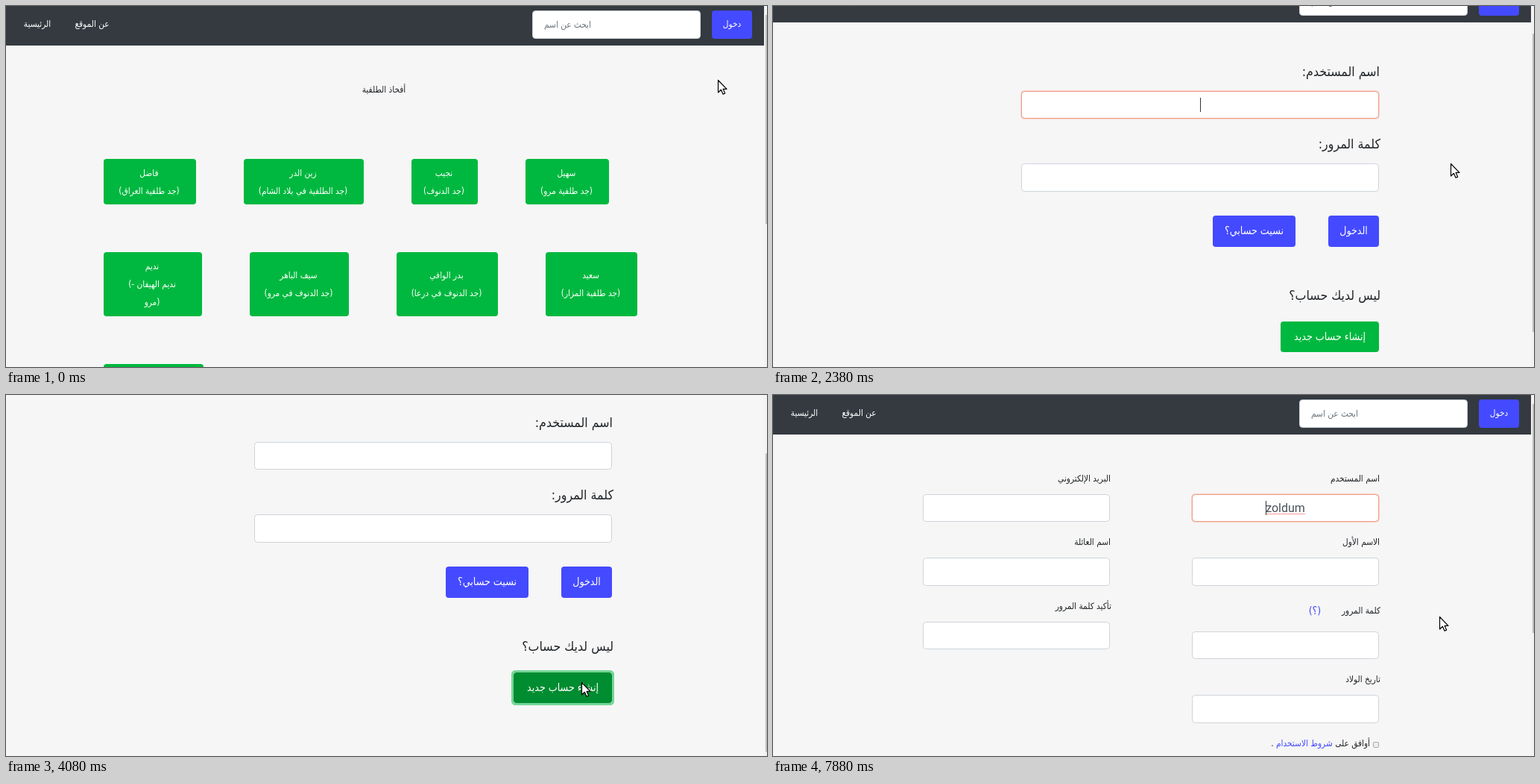
Recreate the animation shown at these times as an HTML page. Size 1021 px wide and 484 px high, loop 8000 ms.

```html
<!DOCTYPE html>
<html lang="ar">
<head>
<meta charset="utf-8">
<style>
html, body { margin: 0; width: 100%; height: 100%; overflow: hidden; background: #f6f6f6; }
svg { display: block; }
text { font-family: "DejaVu Sans", sans-serif; font-stretch: condensed; white-space: pre; }
.typed { font: 16px Roboto, sans-serif; }
</style>
</head>
<body>
<svg id="stage" width="1021" height="484" viewBox="0 0 1021 484"></svg>
<script>
const LOOP = 8000, USERNAME = 'zoldum';
const BLUE = '#444aff', GREEN = '#00b83f', INK = '#212529';
const stage = document.getElementById('stage');
const $ = id => document.getElementById(id);

// Calibrate the Arabic face once so that 16 units match the page's body text.
function bodyScale() {
  stage.innerHTML = '<text id="probe" font-size="160" direction="rtl">اسم المستخدم</text>';
  return 66 * 10 / $('probe').getComputedTextLength();
}
const scale = bodyScale();

const text = (x, y, str, { size = 16, fill = INK, anchor = 'middle', dir = 'rtl' } = {}) =>
  `<text x="${x}" y="${y}" font-size="${(size * scale).toFixed(2)}" fill="${fill}" text-anchor="${anchor}" direction="${dir}">${str}</text>`;
const label = (x, y, str, size) => text(x, y, str, { size, anchor: 'start' });
const box = (x, y, w, h, fill, extra = '') =>
  `<rect x="${x}" y="${y}" width="${w}" height="${h}" rx="4" fill="${fill}" ${extra}/>`;
const input = (x, y, w, h = 37) => box(x + .5, y + .5, w - 1, h - 1, '#fff', 'stroke="#ced4da"');
const focusRing = (id, x, y, w, h) => `<g id="${id}">
  ${box(x - .5, y - .5, w + 1, h + 1, 'none', 'stroke="#f9d3c8"')}
  ${box(x + .5, y + .5, w - 1, h - 1, 'none', 'stroke="#f19e88"')}</g>`;
const caret = (id, x, y) => `<rect id="${id}" x="${x}" y="${y}" width="1" height="19" fill="#333"/>`;
const button = (x, y, w, h, str, fill = BLUE, size = 19.2, id = '') =>
  box(x, y, w, h, fill) +
  (id && box(x, y, w, h, '#000', `id="${id}"`)) +
  text(x + w / 2, y + h / 2 + size * .27 - 1, str, { size, fill: '#fff' });

function card(x, y, w, h, lines, dir = 'rtl') {
  const first = y + h / 2 - (lines.length - 1) * 12 + 4;
  return box(x, y, w, h, GREEN) +
    lines.map((s, i) => text(x + w / 2 - 1, first + i * 24, s, { fill: '#fff', dir })).join('');
}

const nav = `<g id="nav">
  <rect width="1017" height="53" fill="#343a40"/>
  ${text(42, 28, 'الرئيسية', { fill: '#fff' })}
  ${text(115.5, 28, 'عن الموقع', { fill: '#fff' })}
  ${input(706, 6, 226, 38)}
  ${text(753.5, 29, 'ابحث عن اسم', { fill: '#6c757d' })}
  ${box(945.5, 4.5, 57, 41, 'none', 'id="navRing" stroke="#4a70b4" stroke-width="3"')}
  ${button(947, 6, 54, 38, 'دخول', BLUE, 16, 'navShade')}
</g>`;

const home = `<g id="home">
  ${text(507, 116, 'أفخاذ الطلفية')}
  ${card(131, 205, 124, 61, ['فاضل', '(جد طلفية العراق)'])}
  ${card(319, 205, 161, 61, ['زين الدر', '(جد الطلفية في بلاد الشام)'])}
  ${card(544, 205, 89, 61, ['نجيب', '(جد الدنوف)'])}
  ${card(697, 205, 112, 61, ['سهيل', '(جد طلفية مرو)'])}
  ${card(131, 330, 132, 86, ['نديم', '(- نديم الهيفان', 'مرو)'], 'ltr')}
  ${card(327, 330, 133, 86, ['سيف الباهر', '(جد الدنوف في مرو)'])}
  ${card(524, 330, 136, 86, ['بدر الوافي', '(جد الدنوف في درعا)'])}
  ${card(724, 330, 123, 86, ['سعيد', '(جد طلفية المزار)'])}
  ${box(131, 480, 134, 61, GREEN)}
</g>`;

const login = `<g id="login">
  ${label(814, 125, 'اسم المستخدم:', 24)}
  ${input(333, 145, 480)}${focusRing('loginRing', 333, 145, 480, 37)}
  ${caret('loginCaret', 573, 154)}
  ${label(815, 222, 'كلمة المرور:', 24)}
  ${input(333, 242, 480, 38)}
  ${button(745, 312, 68, 42, 'الدخول')}
  ${button(590, 312, 111, 42, 'نسيت حسابي؟')}
  ${label(815, 425, 'ليس لديك حساب؟', 24)}
  ${box(679.5, 452.5, 135, 44, 'none', 'id="newRing" stroke="#74d698" stroke-width="3"')}
  ${button(681, 454, 132, 41, 'إنشاء حساب جديد', GREEN, 19.2, 'newShade')}
</g>`;

const signup = `<g id="signup">
  ${label(814, 116, 'اسم المستخدم')}
  ${label(814, 201, 'الاسم الأول')}
  ${label(815, 293, 'كلمة المرور')}
  ${text(727, 294, '(؟)', { size: 19.2, fill: BLUE })}
  ${label(815, 385, 'تاريخ الولاد')}
  ${label(453, 116, 'البريد الإلكتروني')}
  ${label(453, 201, 'اسم العائلة')}
  ${label(454, 287, 'تأكيد كلمة المرور')}
  ${input(562, 133, 251)}${input(562, 218, 251, 38)}${input(562, 317, 251)}${input(562, 402, 251, 38)}
  ${input(201, 133, 251)}${input(201, 218, 251, 38)}${input(201, 304, 251)}
  ${focusRing('userRing', 562, 133, 251, 37)}
  <text id="user" class="typed" x="687.5" y="157" fill="#495057" text-anchor="middle"></text>
  <path id="spell" stroke="#f03030" stroke-dasharray="1 1"/>
  ${caret('userCaret', 687, 142)}
  <rect x="805.5" y="465.5" width="7" height="7" rx="1.5" fill="#eee" stroke="#aaa"/>
  ${label(801, 471, `أوافق على <tspan fill="${BLUE}">شروط الاستخدام</tspan> .`)}
</g>`;

stage.innerHTML = `<rect width="1021" height="484" fill="#f6f6f6"/>
  <g id="page">${nav}${home}${login}${signup}</g>
  <rect x="1017" width="4" height="484" fill="#f3f3f3"/>
  <rect id="thumb" x="1019" width="2" fill="#bdbdbd"/>
  <g id="pointer" stroke="#000" stroke-width="1.2" fill="#fff" stroke-linejoin="round">
    <path id="arrow" d="M.5 .5V17L4.4 13.3 7 19.2 9.6 18.1 7.1 12.3H12Z"/>
    <g id="hand" transform="translate(-6)">
      <path d="M4.5 1.7Q6 0 7.5 1.7V6L13.5 7Q15.5 7.4 15.4 9.5L14.8 12.5 13.6 16H5.5L1 10.4Q.4 8.3 2.6 8.6L4.5 10.3Z"/>
      <path d="M7.5 6V9M10.2 6.6V9M12.8 7V9.3" fill="none" stroke-width=".8"/>
    </g>
  </g>`;

// Value of the latest [time, value] entry that has been reached.
function stepAt(t, steps) {
  let value = steps[0][1];
  for (const [time, v] of steps) if (t >= time) value = v;
  return value;
}
const show = (id, on) => $(id).setAttribute('visibility', on ? 'inherit' : 'hidden');
const fade = (id, amount) => $(id).setAttribute('opacity', amount);

const SCROLL = [[0, 0], [2250, 9], [2380, 31], [2500, 60], [2630, 77], [2750, 82], [4460, 0]];
const TYPED = [[0, 0], [5330, 1], [5880, 2], [6000, 3], [6290, 4], [6420, 5], [6670, 6]];
const POINTER = [
  [1670, [973, 22]], [1790, [952, 92]], [1880, [921, 178]], [2000, [909, 211]],
  [2500, [905, 211]], [2750, [901, 214]], [2960, [850, 318]], [3080, [805, 385]],
  [3210, [784, 386]], [3330, [772, 385]], [4460, [772, 385]], [4580, [803, 362]],
  [4690, [848, 328]], [4800, [882, 305]], [4920, [894, 297]]
];

function pointerAt(t) {
  if (t >= 1670) return stepAt(t, POINTER);
  const step = t < 210 ? 0 : Math.min(15, 1 + Math.floor((t - 210) / 41.4));
  const p = step / 15, e = p * p * (3 - 2 * p);
  return [955 + 18 * e, 99 - 77 * e];
}

function render(t) {
  const page = t < 1670 ? 'home' : t < 4460 ? 'login' : 'signup';
  for (const id of ['home', 'login', 'signup']) show(id, id === page);

  const scroll = stepAt(t, SCROLL);
  $('page').setAttribute('transform', `translate(0 ${-scroll})`);
  $('thumb').setAttribute('y', 12 + scroll * .81);
  $('thumb').setAttribute('height', { home: 280, login: 400, signup: 307 }[page]);

  const [x, y] = pointerAt(t);
  const overNav = t < 1670 && y < 44;
  const hand = overNav || (t >= 3080 && t < 3960);
  $('pointer').setAttribute('transform', `translate(${x.toFixed(1)} ${y.toFixed(1)})`);
  show('hand', hand);
  show('arrow', !hand);

  fade('navShade', overNav ? .14 : 0);
  fade('navRing', stepAt(t, [[0, 0], [960, .3], [1020, .6], [1080, .8], [1670, 0]]));
  fade('loginRing', stepAt(t, [[0, 0], [1790, .5], [1880, 1], [3960, .4], [4080, 0]]));
  fade('newShade', stepAt(t, [[0, 0], [3210, .1], [3330, .16], [3960, .2], [4080, .24]]));
  fade('newRing', stepAt(t, [[0, 0], [3960, .5], [4080, 1]]));
  fade('userRing', stepAt(t, [[0, 0], [4580, .5], [4690, 1]]));
  fade('loginCaret', stepAt(t, [[0, 0], [1880, 1], [2960, 0], [3500, 1], [3960, 0]]));
  fade('userCaret', stepAt(t, [[0, 0], [4690, 1], [7290, 0], [7880, 1]]));

  const typed = USERNAME.slice(0, stepAt(t, TYPED)), user = $('user');
  if (user.textContent !== typed) user.textContent = typed;
  const half = typed ? user.getComputedTextLength() / 2 : 0;
  $('userCaret').setAttribute('x', Math.floor(687.5 - half));
  $('spell').setAttribute('d', `M${687.5 - half} 159.5H${687.5 + half}`);
  show('spell', t >= 7880);
}

function tick() {
  render(performance.now() % LOOP);
  requestAnimationFrame(tick);
}
tick();
</script>
</body>
</html>
```
